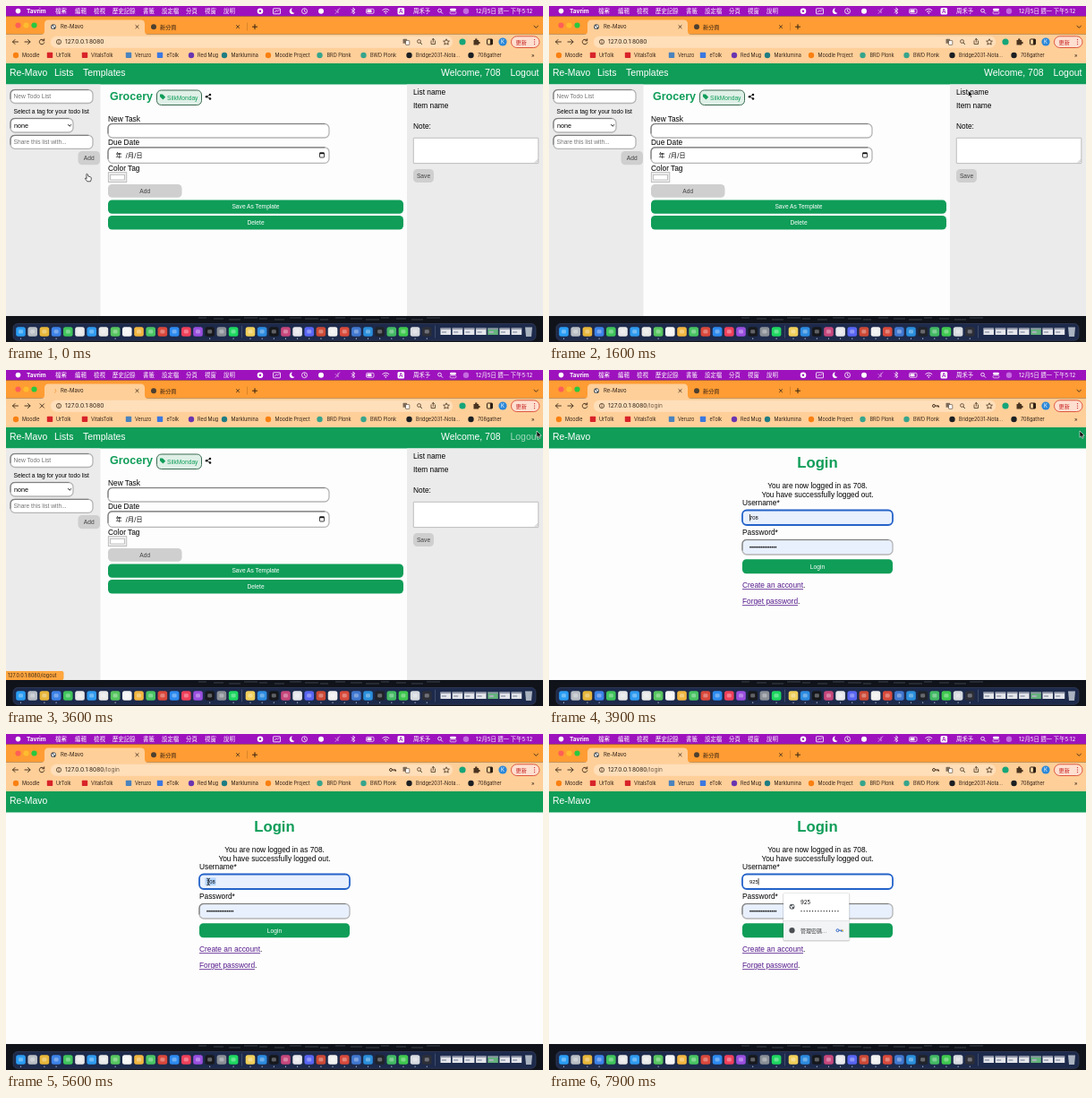
An HTML page that plays this animation: 600x375 px, repeating every 8000 ms.

```html
<!DOCTYPE html>
<html lang="zh-Hant">
<head>
<meta charset="utf-8">
<title>Re-Mavo</title>
<style>
html, body { margin: 0; width: 100%; height: 100%; overflow: hidden; background: #111; }
svg { display: block; width: 100vw; height: 100vh; }
text { font-family: "Liberation Sans", Arial, sans-serif; white-space: pre; }
.ui text { font-family: Inter, "Noto Sans CJK TC", "Noto Sans CJK", sans-serif; }
.line { fill: none; stroke-linecap: round; stroke-linejoin: round; }
</style>
</head>
<body>
<svg id="stage" viewBox="0 0 600 375" preserveAspectRatio="none"></svg>
<script>
const GREEN = '#0f9d58', INK = '#4a3420', GREY = '#cfcfcf';
const rect = (x, y, w, h, fill, r = 0, extra = '') =>
  `<rect x="${x}" y="${y}" width="${w}" height="${h}" rx="${r}" fill="${fill}" ${extra}/>`;
const disc = (x, y, r, fill, extra = '') => `<circle cx="${x}" cy="${y}" r="${r}" fill="${fill}" ${extra}/>`;
const text = (x, y, size, str, fill = '#000', extra = '') =>
  `<text x="${x}" y="${y}" font-size="${size}" fill="${fill}" ${extra}>${str}</text>`;
const mid = (x, y, size, str, fill, extra = '') => text(x, y, size, str, fill, 'text-anchor="middle" ' + extra);
const line = (d, color = INK, w = 0.9, extra = '') =>
  `<path class="line" d="${d}" stroke="${color}" stroke-width="${w}" ${extra}/>`;
const group = (id, body, extra = '') => `<g id="${id}" ${extra}>${body}</g>`;
const cross = (x, y, r, color, w) => line(`M${x - r} ${y - r}l${2 * r} ${2 * r}m0 ${-2 * r}l${-2 * r} ${2 * r}`, color, w);
const globe = (x, y) => disc(x, y, 2.9, '#50555a') +
  `<path d="M${x - 2.2} ${y - 1}l2 .6 .5 1.6 -1 1.4zM${x + .2} ${y - 2.3}l1.9 1.2 -.3 1.7 -1.5 -.6z" fill="#fff"/>`;
const lens = (x, y, color) => disc(x - .5, y - .5, 1.9, 'none', `stroke="${color}" stroke-width=".8"`) +
  line(`M${x + 1} ${y + 1}l1.7 1.7`, color, .9);
const key = (x, y, color) => disc(x - 2, y, 1.5, 'none', `stroke="${color}" stroke-width="1"`) +
  line(`M${x - .5} ${y}h4v1.3m-1.5 -1.3v1.1`, color, 1);
const field = (x, y, w, h, fill = '#fff') =>
  rect(x, y, w, h, fill, 5, 'stroke="#b5b5b5" stroke-width="1.3"') +
  line(`M${x} ${y + h - 5}V${y + 5}q0 -5 5 -5H${x + w - 5}`, '#808080', 1.2);
const button = (x, y, w, h, label, fill = GREEN, color = '#fff') =>
  rect(x, y, w, h, fill, 4.5) + mid(x + w / 2, y + h / 2 + 2.3, 6.67, label, color);
const dots = (x, y, n, step, r) =>
  Array.from({ length: n }, (_, i) => disc(x + i * step, y, r, '#111')).join('');

function menuBar() {
  const menus = [[55, '檔案'], [77, '編輯'], [98, '檢視'], [119, '歷史記錄'], [153, '書籤'],
    [174, '設定檔'], [201, '分頁'], [222, '視窗'], [243, '說明']];
  const w = '#fff';
  return rect(0, 0, 600, 11.5, '#9d12bd') + disc(13.5, 5.6, 2.8, w) +
    text(23, 8, 6.5, 'Tavrim', w, 'font-weight="700"') +
    menus.map(([x, s]) => text(x, 8, 6.4, s, w)).join('') +
    disc(284, 5.7, 3.3, w) + disc(284, 5.7, 1.2, '#9d12bd') +
    rect(298.5, 2.8, 8, 6, 'none', .5, `stroke="${w}" stroke-width=".8"`) + line('M300 7l2 -2 1.5 1 2 -2', w, .7) +
    `<path d="M320 2.6a3.2 3.2 0 1 0 2.4 5.2a3 3 0 0 1 -2.4 -5.2" fill="${w}"/>` +
    disc(333.5, 5.7, 3, 'none', `stroke="${w}" stroke-width=".8"`) + line('M333.5 4v2l1.3 .8', w, .7) +
    disc(352, 5.7, 3, w) + line('M368 4.5l3 3m0 -4v4m-3 1l5 -6', '#d89be5', .8) +
    line('M388 2.5v6.4l2 -1.7 -4 -3.2m0 3.2l4 -3.2 -2 -1.6', w, .7) +
    rect(402.5, 3.3, 8.5, 5, 'none', 1.2, `stroke="${w}" stroke-width=".7"`) + rect(403.5, 4.3, 5, 3, w, .4) +
    line('M420.7 4.6q3.6 -3 7.2 0m-5.6 1.7q2 -1.7 4 0', w, .9) + disc(424.3, 8, .8, w) +
    rect(437.5, 2, 7.6, 7.6, w, 1.5) + mid(441.3, 8.1, 6.2, 'A', '#9d12bd', 'font-weight="600"') +
    text(455, 8, 6.4, '周禾予', w) + lens(485, 5.6, w) +
    rect(496, 2.7, 7, 2.7, w, 1.3) + rect(496, 6.1, 7, 2.7, 'none', 1.3, `stroke="${w}" stroke-width=".6"`) +
    disc(514, 5.7, 3.2, '#c56be0') + text(525, 8, 6.3, '12月5日 週一 下午5:12', w);
}

function browserBar() {
  const marks = [[11, 18, 'Moodle', '#f98012'], [49, 56, 'UrTolk', '#d8232a', 1], [88, 95, 'VitalsTolk', '#d8232a', 1],
    [137, 144, 'Veruzo', '#4a83bd', 1], [172, 179.5, 'eTolk', '#3b78e0', 1], [207, 214, 'Red Mug', '#6a35b0'],
    [244, 251.5, 'Marklumina', '#1e7d83'], [293, 300.5, 'Moodle Project', '#f98012'],
    [350.5, 358.5, 'BRD Plonk', '#36a58c'], [399.5, 407, 'BWD Plonk', '#36a58c'],
    [450.5, 458, 'Bridge2031-Nota...', '#1b1f23'], [519.5, 527, '708gather', '#1b1f23']];
  return rect(0, 11.5, 600, 20, '#ff9c33') +
    ['#ff5f57', '#febc2e', '#28c840'].map((c, i) => disc(13.5 + 9 * i, 21.5, 3.1, c)).join('') +
    `<path d="M39 32q4 0 4 -4v-8q0 -4.5 4.5 -4.5h103q4.5 0 4.5 4.5v8q0 4 4 4z" fill="#ffcf99"/>` +
    group('favicon', globe(53, 23.2)) +
    group('spinner', line('M50.2 23.2a2.8 2.8 0 0 1 2.8 -2.8', '#f4a24a', .9)) +
    text(61, 25.4, 6, 'Re-Mavo', '#2d2015') + cross(146.5, 23.2, 1.6, INK, .9) +
    disc(165, 23.2, 3, '#4d4030') + text(172, 25.5, 6.2, '新分頁', '#2d2015') + cross(259, 23.2, 1.6, INK, .9) +
    line('M269.5 19v8', '#c27420', .6) + line('M275.5 23.2h5m-2.5 -2.5v5', '#332411', 1) +
    line('M590 22.3l2.2 2 2.2 -2', INK, 1) +
    rect(0, 31.5, 600, 32.5, '#ffcf99') + rect(50, 33.7, 449, 13, '#ffdfba', 6.5) +
    line('M13.5 40h-6m2.5 -2.5l-2.5 2.5 2.5 2.5M21 40h6m-2.5 -2.5l2.5 2.5 -2.5 2.5', INK, 1) +
    group('reload', line('M42.3 38.3a2.8 2.8 0 1 0 .5 2.5M42.7 36.8v2h-2', INK, 1)) +
    group('stop', cross(40.3, 40, 2.2, INK, 1)) +
    disc(59, 40, 2.6, 'none', `stroke="${INK}" stroke-width=".8"`) + line('M59 40v1.3m0 -2.7v.1', INK, .8) +
    `<text x="66" y="42.4" font-size="6.6" fill="#2d2015">127.0.0.1:8080<tspan id="path" fill="#6d5a45"></tspan></text>` +
    group('barKey', key(432, 40, INK)) +
    rect(443.5, 36.8, 4.6, 5, '#7d6b58', .6) + rect(446.5, 38.6, 4.3, 4.8, '#fff', .5, `stroke="${INK}" stroke-width=".6"`) +
    lens(462, 40, INK) + line('M475 39v3.5h4.5v-3.5m-2.2 1.5v-4m-1.3 1.2l1.3 -1.2 1.3 1.2', INK, .8) +
    `<path d="M492 36.8l1 2.2 2.4 .2 -1.8 1.6 .6 2.3 -2.2 -1.2 -2.2 1.2 .6 -2.3 -1.8 -1.6 2.4 -.2z" fill="none" stroke="${INK}" stroke-width=".8"/>` +
    disc(510, 40, 3.6, '#15a579') +
    `<path d="M522.5 38h1.7a1.2 1.2 0 1 1 2.2 0h1.7v2a1.1 1.1 0 1 1 0 2v1.5h-5.6z" fill="${INK}"/>` +
    rect(537.5, 37, 6, 6, 'none', .7, 'stroke="#2d2015" stroke-width="1"') + rect(541, 37, 2.5, 6, '#2d2015') +
    disc(555, 40, 4.6, '#2b88d8') + mid(555, 42.1, 5.6, 'K', '#fff') +
    rect(564.5, 33.8, 31.5, 12.7, '#ffdfd0', 6.3, 'stroke="#d94a32" stroke-width=".9"') +
    text(569.5, 42.5, 6.2, '更新', '#c5221f') +
    [-1, 0, 1].map(i => disc(590.5, 40.1 + 2.5 * i, .7, '#c5221f')).join('') +
    marks.map(([ix, tx, s, c, square]) =>
      (square ? rect(ix - 3.2, 51.7, 6.4, 6.4, c, .8) : disc(ix, 55, 3.2, c)) + text(tx, 57, 5.5, s, '#2d2015')).join('') +
    text(587, 57, 6, '»', '#2d2015');
}

function dock() {
  const left = ('#2a9df4 #b9bec5 #e8b63a #3c82e8 #3fc45b #e8e8e8 #2f9bf0 #e9e9e9 #57c65f #f5f5f5 #f2b640 ' +
    '#49c463 #d9483b #2d8af0 #f0405a #9a4fe0 #17191d #8a8f96 #1ed760').split(' ');
  const right = ('#f0cf5a #2c8be0 #15171b #c7477c #e7e7ec #5865f2 #cc4936 #f0f0f0 #d84a3b #4078d0 #2a8fdc ' +
    '#202329 #43b964 #3fc84f #d7dbe0 #2d2f38').split(' ');
  const running = [0, 2, 3, 8, 16, 18];
  const icon = (x, c) => rect(x - 5.3, 358.2, 10.6, 10.6, c, 2.5) + rect(x - 2.5, 361.2, 5, 4.3, '#fff', 1.3, 'opacity=".32"');
  const light = x => disc(x, 371.2, .6, '#ccd3e3');
  const divider = x => line(`M${x} 357v13`, '#59647f', .6);
  const leftX = i => 16.5 + i * 13.2, rightX = i => 273 + i * 13.15;
  let out = rect(0, 346, 600, 29, '#10131a');
  for (let i = 0; i < 16; i++) out += rect(215 + i * 17, 347 + i % 3, 9 + i % 4 * 2, 2, '#3a3d45', 0, 'opacity=".55"');
  out += rect(8, 354.5, 584, 18.8, '#1d2a4b', 5, 'stroke="#414d6b" stroke-width=".5"');
  out += left.map((c, i) => icon(leftX(i), c) + (running.includes(i) ? light(leftX(i)) : '')).join('') + divider(263.5);
  out += right.map((c, i) => icon(rightX(i), c) + light(rightX(i))).join('') + divider(479.5);
  for (let i = 0; i < 7; i++) {
    const x = 485.5 + i * 13.2;
    out += rect(x, 359.5, 11.5, 7.5, i === 4 ? '#64b47c' : '#e4e6eb') + rect(x, 359.5, 11.5, 1.6, '#8d94a5') +
      rect(x + 1.5, 363, 5, 2, '#a9afbd');
  }
  return out + `<path d="M580 358.5h8l-1 10.5h-6z" fill="#aab3c0"/>`;
}

function listPage() {
  return rect(0, 87.5, 105.5, 258.5, '#ebebeb') + rect(448, 87.5, 152, 258.5, '#ebebeb') +
    text(54, 78, 10.45, 'Lists', '#fff') + text(86, 78, 10.45, 'Templates', '#fff') +
    text(486, 78, 10.45, 'Welcome, 708', '#fff') + text(563.5, 78, 10.45, 'Logout', '#fff', 'id="logout"') +
    field(5, 93.5, 92, 15) + text(8.5, 103.2, 6.67, 'New Todo List', '#757575') +
    text(8.5, 119.5, 6.67, 'Select a tag for your todo list') +
    field(5, 125.5, 70, 15.5) + text(9, 135.9, 7.2, 'none') + line('M69.5 132.5l1.7 1.7 1.7 -1.7', '#222', 1) +
    field(5, 144.3, 92, 15) + text(8.5, 154, 6.67, 'Share this list with...', '#757575') +
    button(80.5, 162, 24.5, 15.2, 'Add', GREY, '#444') +
    text(116, 105, 12.5, 'Grocery', GREEN, 'font-weight="700"') +
    rect(168.5, 94, 50, 16.5, '#dff0e7', 5, 'stroke="#3b6b52" stroke-width="1"') +
    `<path d="M172 98.5h3l3.2 3.2 -2.8 2.8 -3.4 -3.3z" fill="${GREEN}"/>` + text(180, 104.7, 6.67, 'SilkMonday', GREEN) +
    line('M228 99l-4 2.2 4 2.2', '#111', .8) +
    [[228, 99], [224, 101.2], [228, 103.4]].map(([x, y]) => disc(x, y, 1.25, '#111')).join('') +
    text(114, 129, 8.33, 'New Task') + field(114, 131.5, 247, 15.5) +
    text(114, 155.3, 8.33, 'Due Date') + field(114, 157.8, 247, 17.5) +
    group('date', text(122.5, 169.3, 7, '年  /月/日'), 'class="ui"') +
    rect(350.5, 164, 5, 5, 'none', .5, 'stroke="#111" stroke-width=".8"') + rect(350.5, 163.5, 5, 1.7, '#111') +
    text(114, 183.8, 8.33, 'Color Tag') + rect(114.3, 185.7, 20.5, 10.8, '#efefef', 0, 'stroke="#b0b0b0" stroke-width=".8"') +
    rect(116.8, 188.2, 15.5, 5.8, '#fff', 0, 'stroke="#8a8a8a" stroke-width=".5"') +
    button(114, 199, 82.5, 14.7, 'Add', GREY, '#444') +
    button(114, 216.5, 330, 15.2, 'Save As Template') + button(114, 234, 330, 15.5, 'Delete') +
    text(455, 99, 8.33, 'List name') + text(455, 113.7, 8.33, 'Item name') + text(455, 136.5, 8.33, 'Note:') +
    rect(455.3, 147.3, 139.5, 28.3, '#fff', .5, 'stroke="#a5a5a5" stroke-width=".7"') +
    line('M591 174.5l3 -3m-1.3 3l1.3 -1.3', '#888', .5) +
    button(455, 182, 23, 15, 'Save', GREY, '#444') +
    group('status', rect(-3, 336, 67.5, 10, '#ffa63f', 2) + text(2, 343.2, 5.5, '127.0.0.1:8080/logout', '#3b2a14'), 'class="ui"');
}

function loginPage() {
  const link = (y, s) => `<text x="216" y="${y}" font-size="8.33"><tspan fill="#551a8b" text-decoration="underline">${s}</tspan>.</text>`;
  const account = (y, name) => globe(271.5, y) + text(281, y - 3, 6.2, name) + dots(282, y + 5, 14, 3.15, .65);
  return mid(300, 109, 16.7, 'Login', GREEN, 'font-weight="700"') +
    mid(300, 131.7, 8.33, 'You are now logged in as 708.') + mid(300, 141.5, 8.33, 'You have successfully logged out.') +
    text(216, 151, 8.33, 'Username*') + text(216, 184.2, 8.33, 'Password*') +
    rect(216, 156.5, 168, 16.5, '#fff', 5, 'id="userBox" stroke="#2463c9" stroke-width="1.8"') +
    rect(222.5, 160.5, 12, 8.5, '#b3d4fd', 0, 'id="selection"') +
    text(224, 166.8, 5.8, '', '#000', 'id="user"') + rect(0, 161, .7, 7.5, '#000', 0, 'id="caret"') +
    field(216, 189.5, 168, 16.5, '#e8f0fe') + dots(225, 197.7, 15, 2.03, .85) +
    button(216, 211.3, 168, 15.9, 'Login') + link(243.3, 'Create an account') + link(261.3, 'Forget password') +
    group('popup',
      rect(261.2, 177.6, 75, 81, '#000', 2, 'id="shadow" opacity=".16"') + rect(262, 178, 73.3, 79, '#fff', 1, 'id="sheet"') +
      group('firstUser', account(192.7, '708')) + group('secondUser', account(220, '925')) +
      group('manage', rect(262, 235.5, 73.3, 21.5, '#f3f4f5') + rect(262, 235.2, 73.3, .6, '#d5d7da') +
        disc(271.5, 246.2, 3.1, '#4b4f54') + text(281, 248.5, 6, '管理密碼...', '#3c4043') + key(324.5, 246.2, '#3268c8') +
        disc(328, 246.2, .9, '#e5b52d')), 'class="ui"');
}

const cursors =
  group('arrow', `<path d="M0 0v7.2l1.7 -1.5 1.2 2.6 1.3 -.6 -1.2 -2.5h2.3z" fill="#000" stroke="#fff" stroke-width=".6"/>`) +
  group('hand', `<path d="M-1.2 -3.3q.9 -.8 1.5 .2l.7 2.3 1.9 .4 1.4 1 -.1 2.2 -.8 2h-3.6l-2.3 -3q-.2 -1.2 1 -.6l.7 .5z" fill="#fff" stroke="#111" stroke-width=".7" stroke-linejoin="round"/>`) +
  group('beam', line('M-1.5 -3.8q1.5 0 1.5 1.2v5.2q0 1.2 -1.5 1.2m3 -7.6q-1.5 0 -1.5 1.2m0 5.2q0 1.2 1.5 1.2', '#111', .8));

document.getElementById('stage').innerHTML =
  dock() + rect(0, 64, 600, 282, '#fdfdfd') + rect(0, 63.5, 600, 24, GREEN) + text(4, 78, 10.45, 'Re-Mavo', '#fff') +
  group('listPage', listPage()) + group('loginPage', loginPage()) +
  group('topBars', menuBar() + browserBar(), 'class="ui"') + cursors;

const el = id => document.getElementById(id);
const show = (id, on) => el(id).setAttribute('display', on ? 'inline' : 'none');
const set = (id, name, value) => el(id).setAttribute(name, value);

// Pointer path: time, x, y
const route = [[0, 91, 191], [250, 91, 191], [850, 152, 150], [1050, 152, 150], [1900, 594, 72], [2600, 594, 72],
  [2900, 593, 68], [3900, 593, 68], [4500, 377, 155], [4800, 377, 155], [5300, 238, 165], [5700, 224, 165], [8000, 224, 165]];

function pointerAt(t) {
  const i = route.findIndex(p => p[0] > t), [t0, x0, y0] = route[i - 1], [t1, x1, y1] = route[i];
  const u = (t - t0) / (t1 - t0), k = u * u * (3 - 2 * u);
  return [x0 + (x1 - x0) * k, y0 + (y1 - y0) * k];
}

function render(t) {
  const login = t >= 3900, hover = t >= 1800 && !login, loading = t >= 2700 && !login;
  const cleared = t >= 6100, typed = t < 7100 ? 0 : t < 7300 ? 1 : t < 7500 ? 2 : 3;
  const filtered = typed > 0;

  show('listPage', !login); show('loginPage', login); show('barKey', login);
  show('favicon', !loading); show('spinner', loading); show('reload', !loading); show('stop', loading);
  show('status', hover);
  set('logout', 'opacity', hover ? .6 : 1);
  set('spinner', 'transform', `rotate(${-t * .36} 53 23.2)`);
  el('path').textContent = login ? '/login' : '';

  el('user').textContent = cleared ? '925'.slice(0, typed) : '708';
  set('userBox', 'fill', cleared ? '#fff' : '#e8f0fe');
  show('selection', t >= 5600 && !cleared);
  show('caret', filtered || (t >= 5600 ? cleared : t % 1000 >= 500));
  set('caret', 'x', 224 + (cleared ? typed * 3.23 : 0));

  const height = filtered ? 52 : 79;
  show('popup', cleared);
  show('firstUser', !filtered);
  set('secondUser', 'transform', `translate(0 ${filtered ? -27.3 : 0})`);
  set('manage', 'transform', `translate(0 ${filtered ? -27 : 0})`);
  set('sheet', 'height', height);
  set('shadow', 'height', height + 1.8);

  const [x, y] = pointerAt(t);
  const shape = cleared ? '' : t < 250 || (t >= 1800 && t < 2700) ? 'hand' : t >= 4400 ? 'beam' : 'arrow';
  for (const id of ['arrow', 'hand', 'beam']) {
    show(id, id === shape);
    set(id, 'transform', `translate(${x} ${y})`);
  }
}

const start = performance.now();
function tick() {
  render(Math.max(0, performance.now() - start) % 8000);
  requestAnimationFrame(tick);
}
tick();
</script>
</body>
</html>
```
